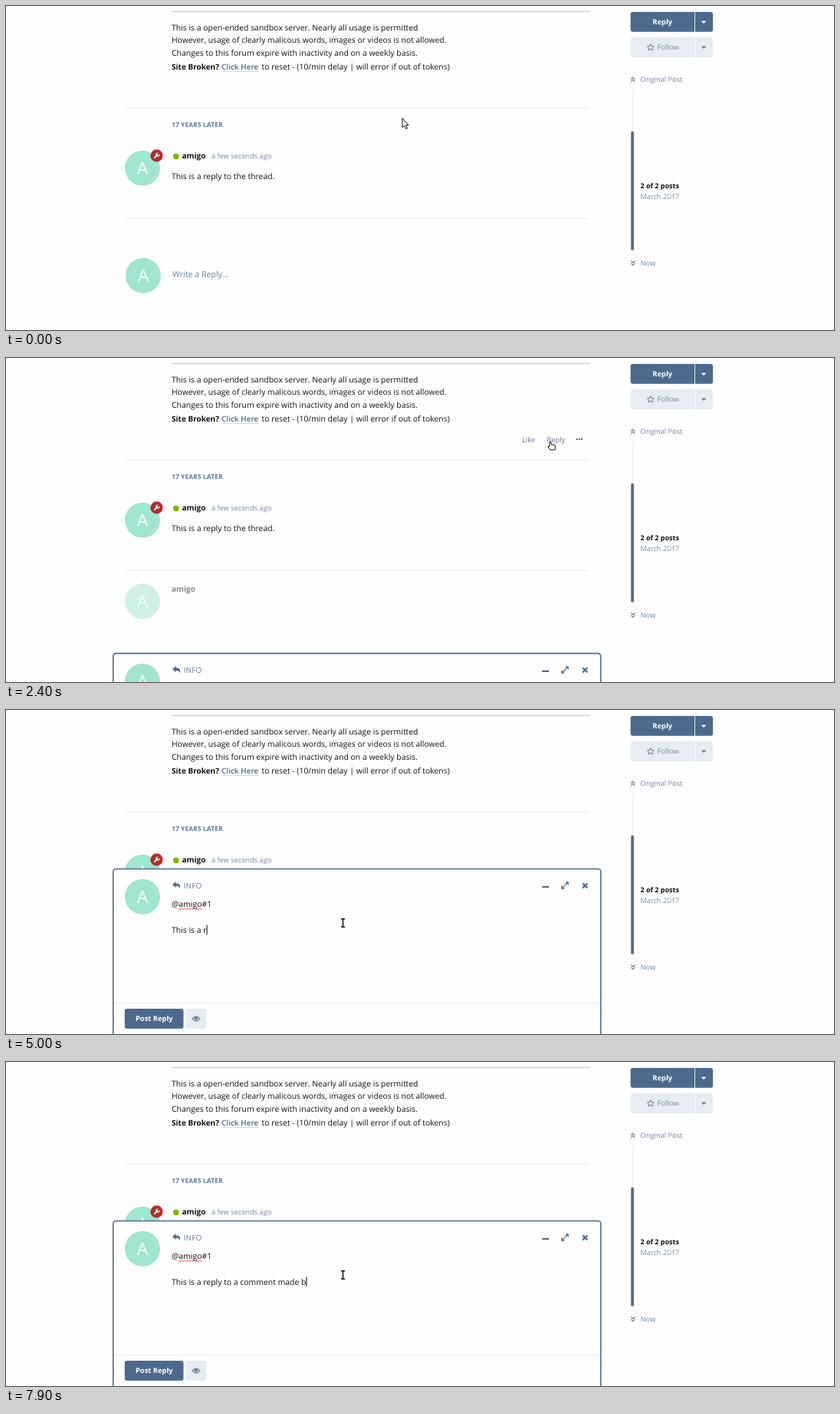
An HTML page for the animation above (8000 ms loop, 1080 by 423 pixels).

```html
<!DOCTYPE html>
<html lang="en">
<head>
<meta charset="utf-8">
<title>Forum reply</title>
<style>
  html, body { margin: 0; height: 100%; overflow: hidden; background: #fefefe; }
  svg { display: block; width: 100vw; height: 100vh; }
  text { font: 10.43px "Open Sans", "Noto Sans", sans-serif; fill: #111; white-space: pre; text-rendering: geometricPrecision; }
  .bold { font-weight: 700; }
  .small { font-size: 9.2px; }
  .button { font-size: 9.35px; }
  .muted { fill: #667c99; }
  .pale { fill: #7388a5; }
  .white { fill: #fff; }
  .letter { font-size: 23px; fill: #f1fffa; text-anchor: middle; }
  .blue { fill: #4d698e; }
  .soft { fill: #e7ebf2; }
  .rule { fill: none; stroke: #e8ecf3; }
  .icon { fill: none; stroke: #667c99; }
  .dark { stroke: #4d698e; }
</style>
</head>
<body>
<svg viewBox="0 0 1080 423">
  <defs>
    <g id="avatar">
      <circle r="23" fill="#a0e5cf"/>
      <text class="letter" y="8.3">A</text>
    </g>
    <path id="chevrons" class="icon" stroke-width="1.2" d="M-2.6 0 L0 -2.6 L2.6 0 M-2.6 3.2 L0 .6 L2.6 3.2"/>
    <path id="caretDown" d="M-3.4 -1.6 H3.4 L0 2 Z"/>
    <path id="splitButton" d="M3 0H83.5V26H3Q0 26 0 23V3Q0 0 3 0M84.3 0H104.5Q107.5 0 107.5 3V23Q107.5 26 104.5 26H84.3Z"/>
  </defs>

  <!-- first post -->
  <path d="M216 7.3H761" stroke="#c9d9ea" stroke-width="1.4"/>
  <text x="216" y="31.5">This is a open-ended sandbox server. Nearly all usage is permitted</text>
  <text x="216" y="48.2" style="font-size:10.33px">However, usage of clearly malicous words, images or videos is not allowed.</text>
  <text x="216" y="65.3">Changes to this forum expire with inactivity and on a weekly basis.</text>
  <text x="216" y="82.5" class="bold" style="font-size:10px">Site Broken?</text>
  <text x="281" y="82.5" style="font-size:10px;font-weight:600;fill:#4d698e">Click Here</text>
  <path d="M281 85.5H330" stroke="#d3dce8"/>
  <text x="333.5" y="82.5">to reset - (10/min delay | will error if out of tokens)</text>
  <g id="actions">
    <text x="673" y="109.6" class="button muted">Like</text>
    <text x="705.5" y="109.6" class="button muted">Reply</text>
    <path d="M744.8 106h.01m3.2 0h.01m3.2 0h.01" stroke="#667c99" stroke-width="2.6" stroke-linecap="round"/>
  </g>
  <path class="rule" d="M155 132.8H761M155 277H761"/>

  <!-- second post -->
  <text x="216" y="157.8" class="bold muted" style="font-size:8.63px">17 YEARS LATER</text>
  <use href="#avatar" x="178" y="211.8"/>
  <circle cx="196.5" cy="196" r="8.3" fill="#000" opacity=".15"/>
  <circle cx="196.5" cy="195.3" r="8" fill="#b72a2a"/>
  <path d="M193.8 198L197.4 194.4" stroke="#fff" stroke-width="1.8" stroke-linecap="round"/>
  <path d="M200 193.8A2 2 0 1 1 198 191.9" stroke="#fff" stroke-width="1.4" fill="none"/>
  <circle cx="221.7" cy="196.4" r="3.8" fill="#7fba00"/>
  <text x="229.5" y="199.4" class="bold" style="font-size:10.1px">amigo</text>
  <text x="268" y="199.4" class="small pale">a few seconds ago</text>
  <text x="216" y="225.8">This is a reply to the thread.</text>

  <!-- reply placeholder and its preview -->
  <g id="placeholder">
    <use href="#avatar" x="179" y="352"/>
    <text x="217" y="354.2" class="muted" style="font-size:10.65px">Write a Reply...</text>
  </g>
  <g id="preview" opacity=".5">
    <use href="#avatar" x="178" y="317.8"/>
    <text x="216" y="304.6" class="bold" style="font-size:10.1px">amigo</text>
  </g>

  <!-- sidebar -->
  <use href="#splitButton" class="blue" x="814.6" y="7.8"/>
  <text x="843.3" y="24.3" class="button bold white">Reply</text>
  <use href="#caretDown" x="910" y="21" fill="#fff"/>
  <use href="#splitButton" class="soft" x="814.6" y="40.9"/>
  <path id="star" class="icon" stroke-linejoin="round"/>
  <text x="849.6" y="57.4" class="button pale">Follow</text>
  <use href="#caretDown" x="910" y="54" fill="#667c99"/>
  <use href="#chevrons" x="817.8" y="95.6"/>
  <text x="827.5" y="99.2" class="small pale">Original Post</text>
  <path class="rule" d="M817.5 109V164"/>
  <rect class="blue" x="815.2" y="163.5" width="3.7" height="155.5" rx="1.8"/>
  <text x="827.5" y="238" class="bold" style="font-size:9px">2 of 2 posts</text>
  <text x="827.5" y="251.6" class="small pale">March 2017</text>
  <use href="#chevrons" transform="translate(817.8 335.8) scale(1 -1)"/>
  <text x="827.5" y="339.2" class="pale" style="font-size:9.4px">Now</text>

  <!-- composer -->
  <g id="composer">
    <rect x="139.8" y="207.5" width="636" height="240" rx="3.5" fill="#fefefe" stroke="#4d698e" stroke-width="1.6"/>
    <use href="#avatar" x="178" y="243.8"/>
    <path class="blue" d="M217 228L221.6 224V226.4C226 226.4 228.6 228.6 226.6 233.6C226.6 230.6 225 229.8 221.6 229.8V232Z"/>
    <text x="231.8" y="232.9" class="muted" style="font-size:10.1px">INFO</text>
    <path class="icon dark" stroke-width="2.2" d="M699.2 230.8H708.2M752.2 226.2L758.4 232.4M758.4 226.2L752.2 232.4"/>
    <path class="icon dark" stroke-width="1.3" d="M725.4 232.6L732.6 225.4M729.8 225H733.2V228.4M724.8 229.6V233H728.2"/>
    <text x="216" y="256.7">@amigo#1 </text>
    <path id="squiggle" fill="none" stroke="#e0352f" stroke-width=".9"/>
    <text id="typed" x="216" y="291"></text>
    <rect id="caret" width="1" height="12.5"/>
    <path class="rule" d="M141 382.5H775"/>
    <rect class="blue" x="154.8" y="390" width="76.7" height="26" rx="3"/>
    <text x="169" y="406.4" class="button bold white">Post Reply</text>
    <rect class="soft" x="235" y="390" width="26" height="26" rx="3"/>
    <path class="icon" stroke-width="1.2" d="M243 403.2Q248 396.8 253 403.2Q248 409.2 243 403.2Z"/>
    <circle class="muted" cx="248" cy="402.6" r="2.2"/>
  </g>

  <g id="pointer" stroke-linejoin="round">
    <path id="arrow" fill="#fff" stroke="#111" d="M0 0V12.2L2.8 9.7L4.7 14L6.5 13.2L4.7 9H8Z"/>
    <path id="hand" fill="#fff" stroke="#111" d="M-1 1.2Q0 -.4 1 1.2V4.4L5 5Q6.8 5.4 6.6 7.4L6 11.4H-.2L-3 7.4Q-2.8 5.6 -1 7Z"/>
    <g id="beam" fill="none">
      <path stroke="#fff" stroke-width="3.4" d="M0 -5V5"/>
      <path stroke="#111" stroke-width="1.5" d="M-2.5 -5.2H2.5M0 -5.2V5.2M-2.5 5.2H2.5"/>
    </g>
  </g>
</svg>
<script>
const LOOP = 8000, OPEN_AT = 2346, OPEN_MS = 200;
const MESSAGE = "This is a reply to a comment made by";
const NEWLINES = [3450, 3600];
const TYPING = [[3700, 0], [5000, 11.4], [6500, 24.4], [7900, 35.2], [8000, 35.9]];
const POINTER_X = [[0, 517], [1000, 597.8], [1700, 710], [2750, 710], [3350, 439.5]];
const POINTER_Y = [[0, 146.5], [1000, 133], [1700, 108.5], [2750, 108.5], [3350, 278]];

const el = id => document.getElementById(id);
const clamp = v => Math.max(0, Math.min(1, v));
const linear = p => p;
const swing = p => 0.5 - Math.cos(Math.PI * p) / 2;
const show = (id, on) => el(id).setAttribute("visibility", on ? "visible" : "hidden");

function track(keys, t, ease = linear) {
  const i = keys.findIndex(([time]) => time > t);
  if (i < 0) return keys[keys.length - 1][1];
  if (i === 0) return keys[0][1];
  const [t0, a] = keys[i - 1], [t1, b] = keys[i];
  return a + (b - a) * ease((t - t0) / (t1 - t0));
}

const starPoints = Array.from({ length: 10 }, (_, i) => {
  const r = i % 2 ? 2.2 : 4.6, angle = i * Math.PI / 5;
  return `${840.8 + r * Math.sin(angle)} ${54.2 - r * Math.cos(angle)}`;
});
el("star").setAttribute("d", `M${starPoints.join("L")}Z`);

let wave = "M225.3 259";
for (let i = 0; i < 15; i++) wave += `l2 ${i % 2 ? -1.6 : 1.6}`;
el("squiggle").setAttribute("d", wave);

function drawCaret(t) {
  const line = NEWLINES.filter(time => t >= time).length;
  const width = line < 2 ? 0 : el("typed").getComputedTextLength();
  el("caret").setAttribute("x", line ? 216 + width : 271);
  el("caret").setAttribute("y", 246.5 + line * 17.1);
  show("caret", t >= NEWLINES[0] || (t - 2500) % 1000 < 500);
}

function drawPointer(t) {
  const x = track(POINTER_X, t, swing), y = track(POINTER_Y, t, swing);
  el("pointer").setAttribute("transform", `translate(${x} ${y})`);
  const overReply = x > 700 && x < 732 && y < 116;
  const overEditor = t > OPEN_AT && y > 242;
  show("hand", overReply);
  show("beam", overEditor);
  show("arrow", !overReply && !overEditor);
}

function draw(t) {
  const opened = t >= OPEN_AT;
  const slide = 216 * (1 - swing(clamp((t - OPEN_AT) / OPEN_MS)));
  el("composer").setAttribute("transform", `translate(0 ${slide})`);
  el("composer").setAttribute("display", opened ? "inline" : "none");
  show("placeholder", !opened);
  show("preview", opened);
  el("actions").setAttribute("opacity", clamp((t - 1050) / 200) * clamp((3150 - t) / 200));
  el("typed").textContent = MESSAGE.slice(0, Math.floor(track(TYPING, t)));
  drawCaret(t);
  drawPointer(t);
}

const start = performance.now();
function frame() {
  draw((performance.now() - start) % LOOP);
  requestAnimationFrame(frame);
}
frame();
</script>
</body>
</html>
```
